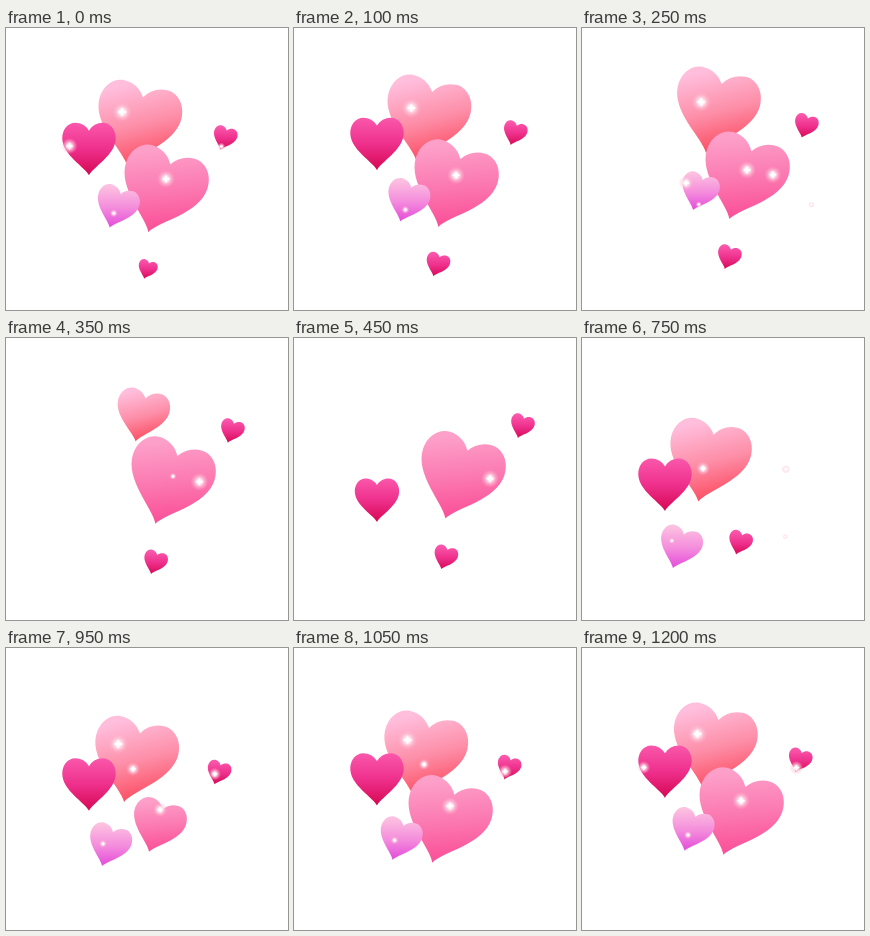
Write an HTML page with a canvas that moves like this. It is 282 px wide and 282 px high and loops after 1250 ms.

```html
<!DOCTYPE html>
<html lang="en">
<head>
<meta charset="utf-8">
<title>Floating hearts</title>
<style>
  html, body { margin: 0; width: 100%; height: 100%; overflow: hidden; background: #fff; }
  canvas { display: block; width: 282px; height: 282px; }
</style>
</head>
<body>
<canvas id="stage" width="282" height="282"></canvas>
<script>
const ctx = document.getElementById('stage').getContext('2d');
const LOOP = 1250, STEP = 50, POP = 90;

// Upright heart, 54 units wide, centred on the origin
const heartPath = new Path2D(
  'M0 26.5C-4 18-27 6-27-11C-27-20-21-26.5-14-26.5C-8-26.5-3-23.5 0-18.5' +
  'C3-23.5 8-26.5 14-26.5C21-26.5 27-20 27-11C27 6 4 18 0 26.5Z');

// x, y: position at birth; vx, vy: pixels per ms; birth, life: ms;
// tilt, slant: degrees the heart and its shading are turned
const rose = ['#fa58ac', '#ee308c', '#d60652'];
const hearts = [
  { x: 127.9, y: 126, vx: .0105, vy: -.0533, birth: 675, life: 960, size: 1.565, tilt: 13, slant: 14, colors: ['#ffbedc', '#fd8ea8', '#fc465a'] },
  { x: 153.4, y: 178.6, vx: .02, vy: -.0525, birth: 915, life: 1050, size: 1.585, tilt: 18, slant: 5, colors: ['#fda0c9', '#fb78b0', '#fb4a94'] },
  { x: 83, y: 165, vx: 0, vy: -.0515, birth: 397, life: 1053, size: .99, tilt: 0, slant: 0, colors: rose },
  { x: 95.3, y: 219.5, vx: .0255, vy: -.061, birth: 573, life: 987, size: .79, tilt: 18, slant: 0, colors: ['#fcc0e0', '#f48cdc', '#e246da'] },
  { x: 211, y: 130, vx: .0205, vy: -.0485, birth: 830, life: 980, size: .445, tilt: 18, slant: 0, colors: rose },
  { x: 141, y: 243.5, vx: .0225, vy: -.049, birth: 1200, life: 950, size: .445, tilt: 18, slant: 0, colors: rose }
];

const sparkles = [
  { x: 111, y: 100, vx: .0125, vy: -.04, birth: 850, life: 740, size: 10 },
  { x: 116.5, y: 137.5, vx: .03, vy: -.047, birth: 600, life: 500, size: 7 },
  { x: 153, y: 163.5, vx: .02, vy: -.036, birth: 900, life: 720, size: 9 },
  { x: 189, y: 149, vx: .026, vy: -.031, birth: 180, life: 595, size: 9 },
  { x: 88, y: 204.5, vx: .036, vy: -.035, birth: 700, life: 850, size: 4 },
  { x: 102, y: 157, vx: .03, vy: -.03, birth: 180, life: 150, size: 8 },
  { x: 60, y: 121, vx: .035, vy: -.03, birth: 1150, life: 200, size: 8 },
  { x: 207.5, y: 127.5, vx: .022, vy: -.025, birth: 890, life: 390, size: 7 },
  { x: 198.5, y: 205, vx: .03, vy: -.04, birth: 590, life: 220, size: 3 },
  { x: 227.5, y: 179, vx: .03, vy: -.04, birth: 190, life: 140, size: 3.5 }
];

// Pops in with an ease-out, pops away with an ease-in
function popScale(age, life) {
  const grow = Math.min(1, age / POP);
  const shrink = Math.max(0, 1 - (life - age) / POP);
  return age >= life ? 0 : (1 - (1 - grow) ** 2) * (1 - shrink ** 2);
}

function gradientFill(gradient, colors) {
  colors.forEach((color, i) => gradient.addColorStop(i / (colors.length - 1), color));
  ctx.fillStyle = gradient;
}

function drawHeart({ size, tilt, slant, colors }) {
  const angle = tilt * Math.PI / 180, lean = Math.sin(angle);
  const shade = (tilt + slant) * Math.PI / 180;
  const gx = 27 * Math.sin(shade), gy = 27 * Math.cos(shade);
  ctx.scale(size, size);
  ctx.translate(-9.7 * lean, 6.5 * lean);
  ctx.rotate(angle);
  gradientFill(ctx.createLinearGradient(-gx, -gy, gx, gy), colors);
  ctx.fill(heartPath);
}

function drawSparkle({ size }) {
  gradientFill(ctx.createRadialGradient(0, 0, 0, 0, 0, size),
    ['#fff', 'rgba(255,240,246,.85)', 'rgba(255,200,218,.45)', 'rgba(255,180,205,0)']);
  ctx.beginPath();
  ctx.arc(0, 0, size, 0, 7);
  ctx.fill();
  ctx.beginPath();
  for (let i = 0; i < 8; i++) {
    const r = size * (i % 2 ? .2 : .5), a = i * Math.PI / 4;
    ctx.lineTo(r * Math.cos(a), r * Math.sin(a));
  }
  ctx.fillStyle = '#fff';
  ctx.fill();
}

function place(item, time, draw) {
  const age = (time - item.birth + LOOP) % LOOP;
  const scale = popScale(age, item.life);
  if (!scale) return;
  ctx.save();
  ctx.translate(item.x + item.vx * age, item.y + item.vy * age);
  ctx.scale(scale, scale);
  draw(item);
  ctx.restore();
}

function render() {
  const time = Math.floor(performance.now() % LOOP / STEP) * STEP;
  ctx.fillStyle = '#fff';
  ctx.fillRect(0, 0, 282, 282);
  hearts.forEach(heart => place(heart, time, drawHeart));
  sparkles.forEach(sparkle => place(sparkle, time, drawSparkle));
  requestAnimationFrame(render);
}
render();
</script>
</body>
</html>
```
